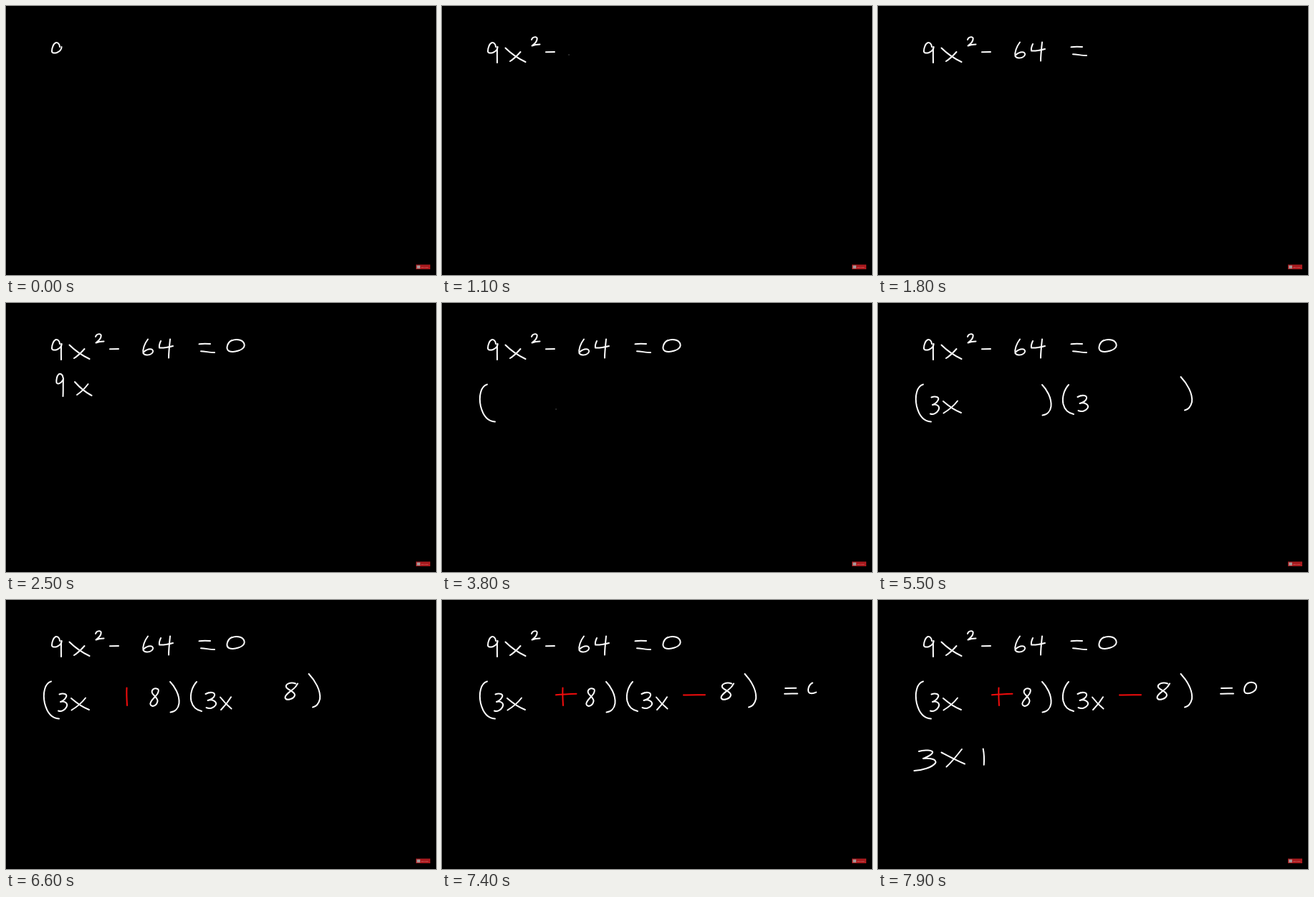
Animation, 600 px wide and 375 px high, one loop 8000 ms. Source, as an HTML page:

```html
<!DOCTYPE html>
<html lang="en">
<head>
<meta charset="utf-8">
<title>Solving a quadratic by factoring</title>
<style>
html, body { margin: 0; width: 100%; height: 100%; overflow: hidden; background: #000; }
svg { display: block; width: 100vw; height: 100vh; }
path { fill: none; stroke-width: 2; stroke-linecap: round; stroke-linejoin: round; }
text { font: 700 2.4px "Liberation Sans", sans-serif; fill: #d77; }
</style>
</head>
<body>
<svg viewBox="0 0 600 375">
  <rect width="600" height="375"/>
  <g id="ink"></g>
  <rect x="572" y="360.5" width="20" height="6.5" fill="#a81a1e"/>
  <rect x="573.3" y="361.7" width="4.6" height="4.2" fill="#a89898"/>
  <text x="579" y="364.7">RECORD</text>
</svg>
<script>
const LOOP = 8000, STEP = 100;
const WHITE = "#fff", RED = "#f20c0c";
const ink = document.getElementById("ink");
const marks = [];

function add(d, from, to, until = LOOP, color = WHITE) {
  const el = document.createElementNS("http://www.w3.org/2000/svg", "path");
  el.setAttribute("d", d);
  el.setAttribute("stroke", color);
  ink.append(el);
  marks.push({ el, from, to, until, len: el.getTotalLength() });
}

// Pen resting on the page: a faint speck
function speck(x, y, from, until) {
  add(`M${x} ${y}h.2`, from - 1, from, until, "#999");
  marks.at(-1).el.style.strokeWidth = 1;
}

// 9x² - 64 = 0
add("M75 57C75 53 72 50.5 70 51C66 52 64 59 64 63C64 66 68 66 71 65C75 63.5 78 60 77.5 57", -200, -100);
add("M77.3 57C76.6 64 77 72 77 79", 0, 200);
add("M88.5 58.5C96 66 106 73 116.5 78", 200, 300);
add("M109.5 64C105 69 100 74 95 77", 300, 500);
add("M125 47C126 43 132 42 132.7 45C133 49 129 53 125.5 55.5C129 54 133 53.5 136.5 53.5", 600, 900);
add("M145 64.3L157 64", 900, 1000);
speck(177, 68, 1100, 1300);
add("M198 50.5C193 57 190.5 65 191.5 70C194 74 203 73 205 68C206 63 198 62.5 192 68.5", 1200, 1400);
add("M216 53C214.5 56 213.5 60 214 62.5C220 63 227 61.5 233 60", 1400, 1500);
add("M229 50.5C228 60 227 69 227 76.5", 1500, 1600);
add("M269.5 57.3C274 56.5 280 56.7 285 57", 1600, 1700);
add("M272 67.3C278 67.5 285 69 291 69", 1700, 1800);
add("M315 52C309 55 306 64 311 67C318 69.5 332 66 332.7 59C332.5 52 323 49 314.5 52.5", 1800, 2000);

// 9x, taken back again
add("M79.5 104C79.5 100 76 98 74 99C71 101 70 107 70.5 111C71.5 114 77 112 79 108C80 106.5 80 105.5 80 105", 2000, 2100, 2900);
add("M80 105C79.5 113 80 122 79.5 130", 2100, 2200, 2900);
add("M96 110C103 118 112 125 119.5 129", 2200, 2300, 2700);
add("M114.5 113C110 119 105 124 99 128", 2300, 2500, 2700);
speck(57, 291, 3200, 3300);

// Brackets
add("M63 113.5C54 116 51 130 54 144C57 156 63 165 74 165.5", 3400, 3700);
speck(159, 148, 3800, 3900);
add("M229 114C235 120 242.5 132 241.5 144C240.5 151 236 156 229.5 156.5", 3800, 4000);
add("M266 114C259.5 121 256.5 132 258.5 141C260.5 149 266 153.5 273 155", 4000, 4100);
add("M422.5 103C431 112 439.5 126 438 138C436.5 144 433 148.5 428 149.5", 4130, 4340);

// Terms inside the brackets
add("M74.5 131.5C80 129.5 86 131 84 135C82 139 79 141 76 142C82 140.5 87 144 84.5 149C82 154 77 156 73 154.5", 4400, 4700);
add("M91 137C99 144 107 149.5 116 153", 4700, 4800);
add("M111 136.5C106 143 99 149 91.5 153.5", 4800, 5000);
add("M278.5 131C285 127.5 292 128.5 291 133C290 137 285 139 281.5 140C288 138 295 141.5 292.5 146.5C289.5 151 284 152 279.5 150", 5200, 5500);
add("M299 135.5C304 142 309 147 314.5 151.5", 5500, 5600);
add("M314 135.3C310 142 305 148 300 153", 5600, 5700);
add("M404 116.5C397 113.5 389.5 117.5 391 121.5C393 125.5 403 127.5 403 132.5C402 138 391.5 141 389.5 136.5C388.5 131.5 400 126 404 121C406 118.5 406 117.5 407 116.5", 5700, 5900);
add("M211.5 124C206 121.5 202 126.5 204.5 130.5C207 134 212 137 211.5 141C210 148.5 203 149.5 201.5 145.5C200 141 208.5 135.5 211.5 130.5C213.5 126.5 213 124.5 211.5 124", 5900, 6050);
speck(188, 153, 6100, 6200);

// Signs
add("M168.5 122.5C168 131 168.5 139 169 147", 6500, 6600, LOOP, RED);
add("M159 132.3C168 131.5 178 131 187.5 130.7", 6600, 6800, LOOP, RED);
add("M337 132.5C348 132 358 132.2 367 132.2", 6800, 7000, LOOP, RED);

// = 0, then 3x and the next stroke
add("M479 123L494 122.7", 7100, 7200);
add("M478 130.7C484 130.8 490 130.5 496 130.5", 7200, 7300);
add("M517 115.5C511.5 118 509 127 513 129.8C519 131.5 528 127 528 121C528 115.5 522 113 516 116", 7300, 7500);
add("M57 211C64 208.5 78 209 76 213C74 217 68 219 63 221C72 220 83 222 80 227.5C75 233.5 62 237.5 50.5 238", 7500, 7650);
add("M88.5 212.5C99 218 109 223.5 121 228.5", 7650, 7700);
add("M117 208C110 217 103 226 95.5 232.5", 7700, 7800);
add("M146.7 207.5C148 214 148.3 222 147.8 229.8", 7800, 7900);

function render(ms) {
  const t = Math.floor((ms % LOOP) / STEP) * STEP;
  for (const { el, from, to, until, len } of marks) {
    const p = Math.min(1, (t - from) / (to - from));
    const on = p > 0 && t < until;
    el.style.display = on ? "" : "none";
    if (on) el.style.strokeDasharray = p < 1 ? `${len * p} ${len + 9}` : "none";
  }
}

let start;
function tick(now) {
  start ??= now;
  render(now - start);
  requestAnimationFrame(tick);
}
render(0);
requestAnimationFrame(tick);
</script>
</body>
</html>
```
